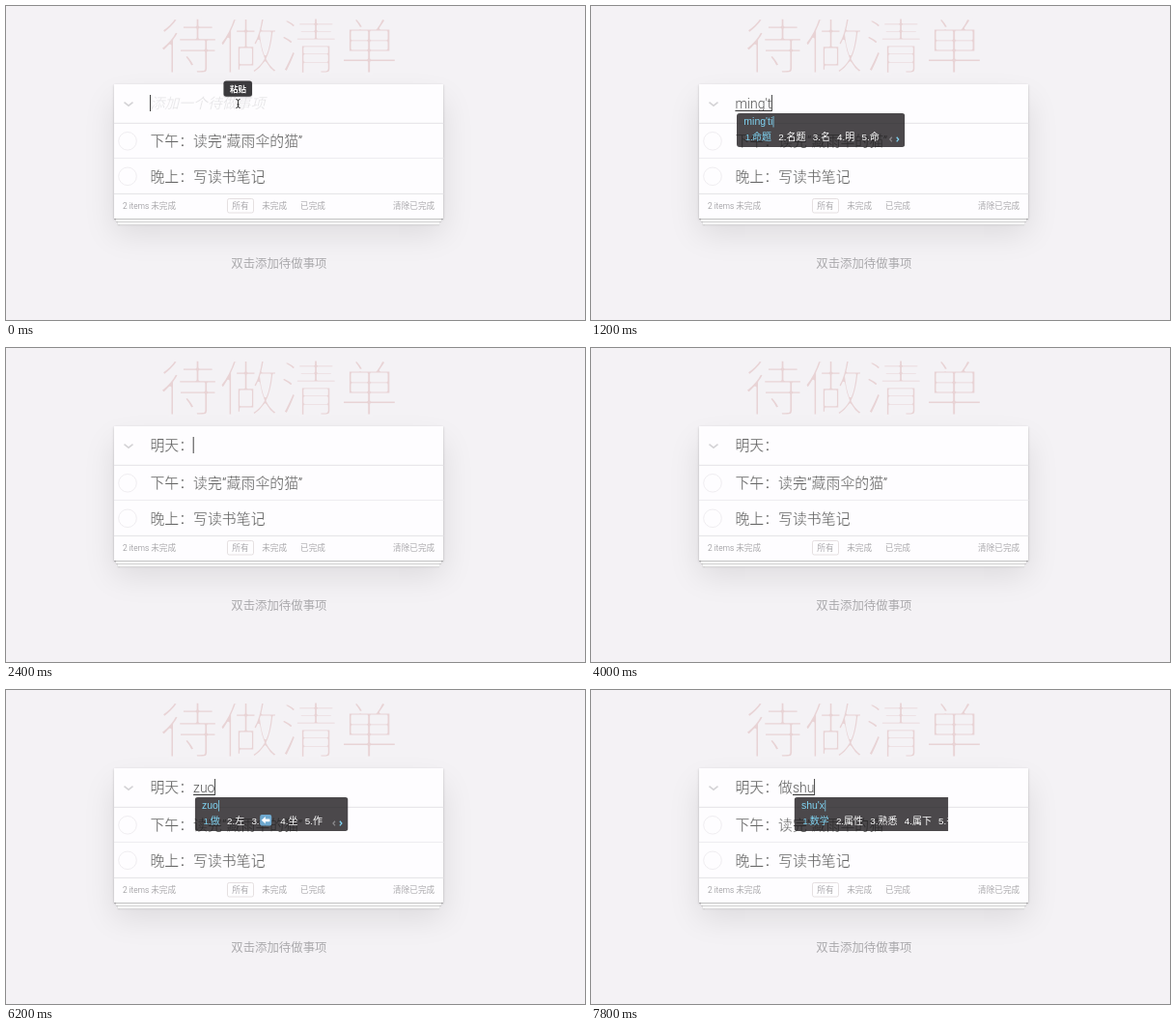
Animation, 600 px wide and 325 px high, one loop 8 s. Source, as an HTML page:

```html
<!DOCTYPE html>
<html lang="zh-CN">
<head>
<meta charset="utf-8">
<title>待做清单</title>
<style>
html, body { margin: 0; width: 100%; height: 100%; overflow: hidden; background: #f4f2f5; }
#stage { position: relative; width: 600px; height: 325px; overflow: hidden; }
.card, .foot, #art { position: absolute; }
.card { left: 112px; top: 81px; width: 341.4px; height: 139px; background: #fefdff;
  box-shadow: 0 1.2px 2.5px rgba(0,0,0,.2), 0 15.5px 31px rgba(0,0,0,.1); }
.foot { left: 0; right: 0; bottom: 0; height: 25px;
  box-shadow: 0 .6px .6px rgba(0,0,0,.2), 0 5px 0 -1.9px #f6f6f6, 0 5.6px .6px -1.9px rgba(0,0,0,.2),
    0 10px 0 -3.7px #f6f6f6, 0 10.6px 1.2px -3.7px rgba(0,0,0,.2); }
.head { position: absolute; left: 0; top: 0; width: 100%; height: 139px; background: #fefdff; }
#art { left: 0; top: 0; }
text { font-family: "Noto Sans CJK SC", "Noto Sans CJK", sans-serif; font-weight: 300; white-space: pre; }
/* a stroke in the background colour thins the glyphs */
.title { font-size: 62.2px; fill: #e8d3d5; stroke: #f4f2f5; stroke-width: 2.9px; stroke-linejoin: round; }
.item { font-size: 14.9px; fill: #666; stroke: #fefdff; stroke-width: .25px; }
.lat { font-family: Roboto, sans-serif; fill: #555; stroke: none; }
.ime { font-family: "Liberation Sans", "Noto Sans CJK SC", sans-serif; font-weight: 400; }
.small { font-size: 8.65px; fill: #aaa9ac; }
.small.lat { font-size: 8.4px; fill: #858488; }
</style>
</head>
<body>
<div id="stage">
  <div class="card"><div class="foot"></div><div class="head"></div></div>
  <svg id="art" width="600" height="325">
    <text class="title" x="158.6" y="64.5">待做清单</text>
    <g stroke="#e4e3e6">
      <path d="M112 121.3H453.4M112 194.4H453.4"/>
      <path d="M112 157.5H453.4" stroke="#eeedf0"/>
    </g>
    <path d="M122.5 99.7L127 103.2L131.5 99.7" fill="none" stroke="#d4d3d6" stroke-width="1.6"/>
    <g fill="none" stroke="#ebe9ed" stroke-width=".8">
      <circle cx="126" cy="139.8" r="9.3"/><circle cx="126" cy="176.3" r="9.3"/>
    </g>
    <text class="item" x="149.4" y="145.4">下午：读完</text>
    <text class="item lat" x="223.9" y="145.4">“</text>
    <text class="item" x="228.6" y="145.4">藏雨伞的猫</text>
    <text class="item lat" x="302.8" y="145.4">”</text>
    <text class="item" x="149.4" y="181.9">晚上：写读书笔记</text>
    <text class="small lat" x="121" y="210.3">2 items</text>
    <text class="small" x="150.2" y="210.4">未完成</text>
    <rect x="229.5" y="199.5" width="27" height="14.5" rx="1.8" fill="none" stroke="#dfd8da" stroke-width=".8"/>
    <text class="small" x="234.3" y="210.4">所有</text>
    <text class="small" x="265.2" y="210.4">未完成</text>
    <text class="small" x="305" y="210.4">已完成</text>
    <text class="small" x="401" y="210.4">清除已完成</text>
    <text x="233.3" y="270.8" style="font-size:12.4px;font-weight:400" fill="#abaaad">双击添加待做事项</text>
    <g id="live"></g>
  </svg>
</div>
<script>
const LOOP = 8000, X0 = 149.4, EM = 14.9, CYAN = '#7fd3f2', ARROW = '⬅';
const live = document.getElementById('live');

// time, committed text, raw letters, popup letters, candidates, caret shown, popup width limit
const steps = [
  [0, '', '', '', '', 1],
  [200, '', 'm', 'm', '吗 没 买 每 妈', 1],
  [400, '', 'mi', 'mi', '米 密 迷 秘 蜜', 1],
  [600, '', 'min', 'min', '民 敏 闽 皿 抿', 1],
  [800, '', 'ming', 'ming', '名 明 命 鸣 铭', 1],
  [1000, '', 'ming', "ming't", '明天 命题 名堂 名帖 名', 1],
  [1200, '', "ming't", "ming'ti", '命题 名题 名 明 命', 1],
  [1400, '', "ming'ti", "ming'tia", '明天 名 明 命 鸣', 1],
  [1600, '', "ming'tia", "ming'tian", '明天 明田 名 明 命', 1],
  [1800, '明天', '', '', '', 1],
  [2400, '明天：', '', '', '', 1],
  [3000, '明天：', '', '', '', 0],
  [3400, '明天：', '', '', '', 1],
  [4000, '明天：', '', '', '', 0],
  [4400, '明天：', '', '', '', 1],
  [5000, '明天：', '', '', '', 0],
  [5400, '明天：', '', '', '', 1],
  [5600, '明天：', 'z', 'z', '在 再 着 做 找', 1],
  [5800, '明天：', 'zu', 'zu', '组 足 族 租 祖', 1],
  [6000, '明天：', 'zu', 'zuo', '做 左 ⬅ 坐 作', 1],
  [6200, '明天：', 'zuo', 'zuo', '做 左 ⬅ 坐 作', 1],
  [6400, '明天：做', '', '', '', 1],
  [6800, '明天：做', '', '', '', 0],
  [7400, '明天：做', '', '', '', 1],
  [7600, '明天：做', 'sh', 'sh', '是 说 上 时 什么', 1],
  [7800, '明天：做', 'shu', "shu'x", '数学 属性 熟悉 属下 书写', 1, 159.5]
];

function add(parent, tag, attrs, str) {
  const el = document.createElementNS('http://www.w3.org/2000/svg', tag);
  for (const k in attrs) el.setAttribute(k, attrs[k]);
  if (str) el.textContent = str;
  parent.appendChild(el);
  return el;
}

function hint() {
  add(live, 'text', { class: 'item', x: X0, y: 106.4, style: 'font-style:italic;fill:#e4e3e6' }, '添加一个待做事项');
  add(live, 'rect', { x: 225, y: 77.5, width: 30.5, height: 17.3, rx: 3, fill: 'rgba(0,0,0,.12)' });
  add(live, 'rect', { x: 225.5, y: 77.5, width: 29.5, height: 16.3, rx: 2.8, fill: '#3b3a3d' });
  add(live, 'text', { x: 231.9, y: 88.8, fill: '#fff', style: 'font-size:8.5px;font-weight:700' }, '粘贴');
  add(live, 'path', { d: 'M238.3 96.6Q240.5 96.6 240.5 98V104Q240.5 105.4 238.3 105.4M242.7 96.6Q240.5 96.6 240.5 98M240.5 104Q240.5 105.4 242.7 105.4M239.3 102H241.7',
    fill: 'none', stroke: '#333', 'stroke-width': 1 });
}

function popup(left, letters, words, limit) {
  const list = words.split(' ');
  const sizes = list.map(w => w === ARROW ? 14.5 : w.length * 10);
  const width = 8.5 + sizes.reduce((a, b) => a + b + 15.4, -1) + 19.8;
  const box = add(live, 'svg', { x: left, y: 111, width: limit || width, height: 35 });
  add(box, 'rect', { width, height: 35, rx: 3, fill: 'rgba(30,28,30,.8)' });
  const label = add(box, 'text', { class: 'ime', x: 7.3, y: 12, fill: CYAN, style: 'font-size:10.5px' }, letters);
  add(box, 'rect', { x: 7.6 + label.getComputedTextLength(), y: 3, width: .8, height: 11.5, fill: CYAN });

  let x = 8.7;
  list.forEach((word, i) => {
    const fill = i ? '#fff' : CYAN, gap = i ? 8.2 : 7.4;
    add(box, 'text', { class: 'ime', x, y: 28, fill, style: 'font-size:9.8px' }, i + 1 + '.');
    if (word === ARROW) {
      add(box, 'rect', { x: x + gap + .6, y: 18, width: 12, height: 11.5, rx: 2, fill: '#6fa9d0' });
      add(box, 'path', { d: `M${x + gap + 2.2} 23.8l4-3.8v2.4h4.6v2.8h-4.6v2.4z`, fill: '#fff' });
    } else {
      add(box, 'text', { class: 'ime', x: x + gap, y: 28, fill, style: 'font-size:10px' }, word);
    }
    x += sizes[i] + gap + 7.2;
  });
  const arrow = (ax, dir, stroke) => add(box, 'path',
    { d: `M${ax - dir} 24.8l${dir * 2} 2.3l${-dir * 2} 2.3`, fill: 'none', stroke, 'stroke-width': 1.3 });
  arrow(width - 14.5, -1, '#8b8a8d');
  arrow(width - 7.6, 1, CYAN);
}

function draw([time, done, raw, letters, words, caret, limit]) {
  live.replaceChildren();
  if (time === 0) hint();
  const left = X0 + done.length * EM;
  let end = left;
  if (done) add(live, 'text', { class: 'item', x: X0, y: 106.4 }, done);
  if (raw) {
    const el = add(live, 'text', { class: 'item lat', x: left, y: 106, style: 'font-size:14px' }, raw);
    end += el.getComputedTextLength();
    add(live, 'rect', { x: left, y: 108, width: end - left, height: 1, fill: '#333' });
  }
  if (caret) add(live, 'rect', { x: end - .4, y: 92, width: 1, height: 17, fill: '#444' });
  if (letters) popup(left + 1.6, letters, words, limit);
}

let shown = null;
function tick() {
  const t = performance.now() % LOOP;
  const step = steps.findLast(s => s[0] <= t);
  if (step !== shown) draw(shown = step);
  requestAnimationFrame(tick);
}
tick();
</script>
</body>
</html>
```
